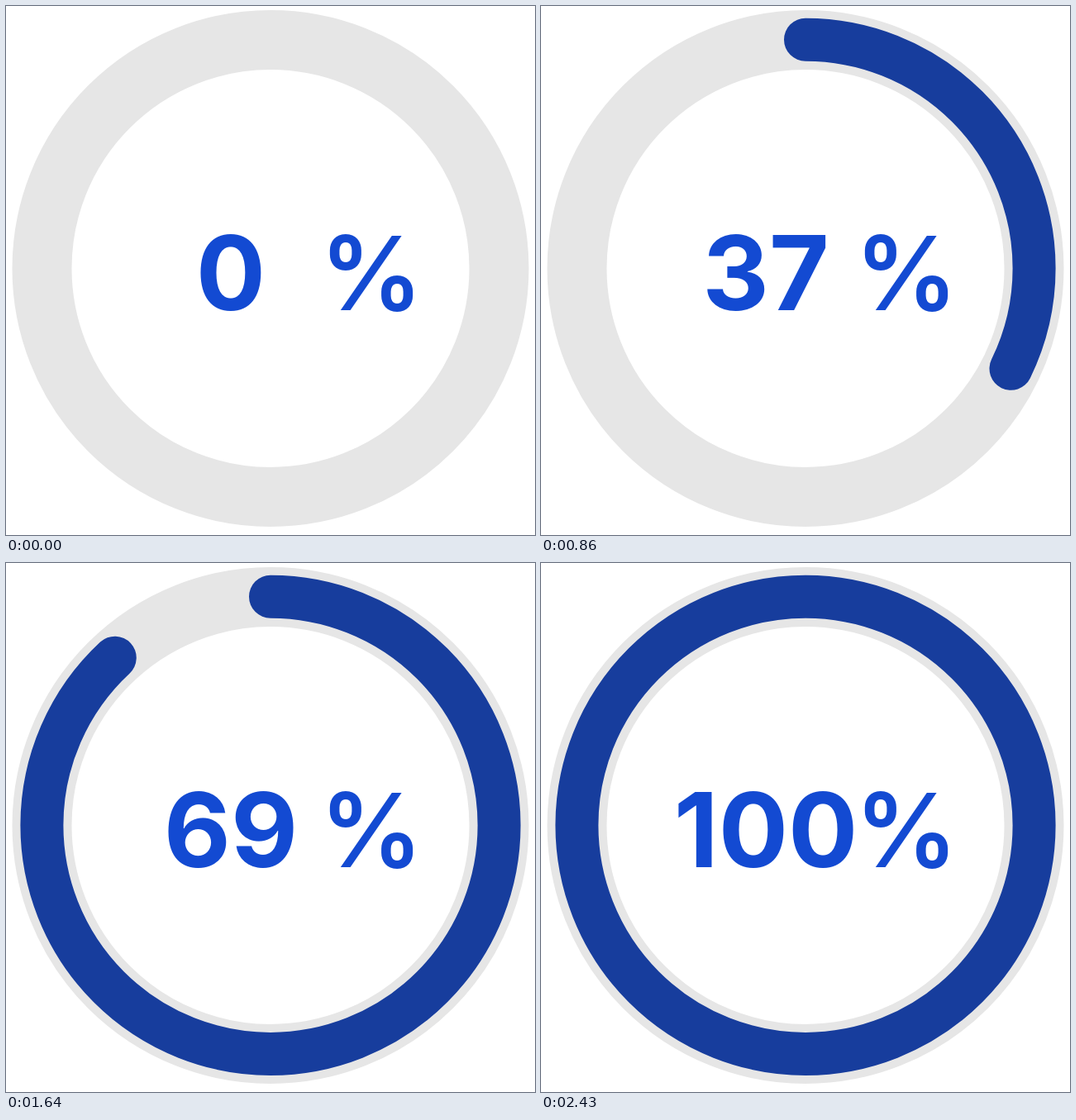
An HTML page that plays this animation: 640x640 px, repeating every 2570 ms.

```html
<!DOCTYPE html>
<html lang="en">
<head>
<meta charset="utf-8">
<title>Progress ring</title>
<style>
  html, body { margin: 0; height: 100%; overflow: hidden; background: #fff; }
  svg { display: block; width: 100%; height: 100%; }
  circle { fill: none; }
  text { font: 700 125px Inter, "Open Sans", sans-serif; fill: #134ad2; text-anchor: middle; }
</style>
</head>
<body>
<svg viewBox="0 0 640 640">
  <circle cx="320" cy="317.5" r="276.5" stroke="#e6e6e6" stroke-width="72"/>
  <circle id="arc" cx="320" cy="317.3" r="276.6" stroke="#173d9d" stroke-width="52"
    stroke-linecap="round" pathLength="360" transform="rotate(-90 320 317.3)"/>
  <text id="count" x="272" y="368"></text>
  <text x="442" y="368" style="font-size:124px;font-weight:600">%</text>
</svg>
<script>
const LOOP = 2570, FPS = 14, LAST = 34, ARC_STEPS = 33.3;
const arc = document.getElementById('arc');
const count = document.getElementById('count');

// Cubic bezier (.455, 0, .397, 1), solved by bisection
function ease(x) {
  let lo = 0, hi = 1;
  for (let i = 0; i < 24; i++) {
    const s = (lo + hi) / 2, r = 1 - s;
    if (3 * .455 * s * r * r + 3 * .397 * s * s * r + s ** 3 < x) lo = s;
    else hi = s;
  }
  return lo * lo * (3 - 2 * lo);
}

function draw(now) {
  // 14 steps per second, snapped to hundredths of a second
  const ticks = Math.floor((now % LOOP) / 10) * 10 + 5;
  const step = Math.min(LAST, Math.floor(ticks * FPS / 1000));
  const angle = step >= ARC_STEPS ? 360 : 360 * ease(step / ARC_STEPS);

  arc.style.display = step ? '' : 'none';
  arc.setAttribute('stroke-dasharray', angle < 360 ? `${angle} 720` : 'none');
  count.textContent = step ? Math.min(100, Math.floor(2.94 * step + 1.75)) : 0;
}

const start = performance.now();
function loop() {
  draw(performance.now() - start);
  requestAnimationFrame(loop);
}
loop();
</script>
</body>
</html>
```
